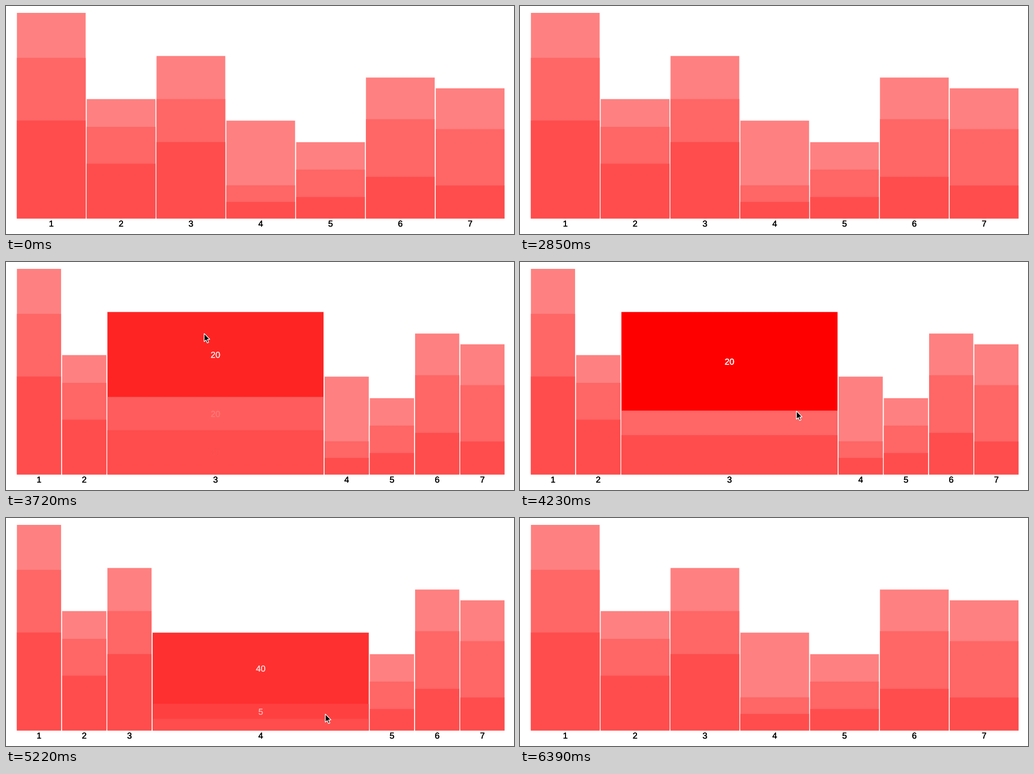
A matplotlib script that plays this animation: 960 px wide and 432 px high, repeating every 6.45 s.

```python
import math

import numpy as np
import matplotlib.pyplot as plt
from matplotlib.animation import FuncAnimation
from matplotlib.patches import Polygon, Rectangle
from matplotlib.patheffects import withStroke

W, H, DPI = 960, 432, 100
STEP, LOOP = 30, 6450
PX = 72 / DPI

LEFT, RIGHT, GAP = 20.6, 942.1, 2
BASE, ZERO, UNIT = 402.6, 401.0, 20.42
LABEL_END = 420
BAR_BASIS, SEG_BASIS = 2.25, 18.4
BAR_GROW, SEG_GROW = 5, 6
DURATION = 250
MOUSE_STEP = 12

# bar heights, and the values stacked in each bar from top to bottom
HEIGHTS = [19, 11, 15, 9, 7, 13, 12]
PARTS = [(20, 30, 50), (20, 30, 50), (20, 20, 40), (40, 5, 5),
         (30, 30, 20), (20, 30, 20), (20, 30, 15)]
TOPS = [ZERO - UNIT * h for h in HEIGHTS]

# key points of the pointer: ms, x, y
PATH = np.array([
    (3050, 352, 404), (3330, 363, 243), (3499, 368, 167.7), (3607, 372, 137.1),
    (3720, 374, 135), (4050, 450, 212), (4230, 522, 282), (4592, 600.2, 299),
    (4680, 613, 302), (4850, 621, 318), (5155, 605, 360.7), (5220, 603, 371),
    (5300, 602, 383), (5730, 597, 419), (5850, 596, 436)])
TIMES, POINTS = PATH[:, 0], PATH[:, 1:]
SLOPES = np.gradient(POINTS, TIMES, axis=0)
ARROW = np.array([(0.4, 0.4), (0.4, 16), (4, 12.7), (6.4, 18.4), (9, 17.3),
                  (6.6, 11.7), (11.2, 11.5)])

_s = np.linspace(0, 1, 400)
_ease_x = 0.75 * _s * (1 - _s) ** 2 + 0.75 * _s**2 * (1 - _s) + _s**3
_ease_y = 0.3 * _s * (1 - _s) ** 2 + 3 * _s**2 * (1 - _s) + _s**3


def ease(x):
    """CSS 'ease' timing curve."""
    return float(np.interp(x, _ease_x, _ease_y))


def pointer(t):
    """Smooth position along the path, or None while off stage."""
    if not TIMES[0] <= t <= TIMES[-1]:
        return None
    k = min(np.searchsorted(TIMES, t, "right") - 1, len(TIMES) - 2)
    span = TIMES[k + 1] - TIMES[k]
    u = (t - TIMES[k]) / span
    return ((1 + 2 * u) * (1 - u) ** 2 * POINTS[k]
            + u * (1 - u) ** 2 * span * SLOPES[k]
            + u * u * (3 - 2 * u) * POINTS[k + 1]
            + u * u * (u - 1) * span * SLOPES[k + 1])


# element -> list of [enter, leave]; bars are keyed b, segments (b, s)
hovers = {}


def hover_amount(key, t):
    """Transition progress; an early leave shortens the way back."""
    amount = 0.0
    for enter, leave in hovers.get(key, []):
        if t <= enter:
            break
        amount = ease((min(t, leave) - enter) / DURATION)
        if t > leave:
            amount *= 1 - ease((t - leave) / (amount * DURATION))
    return amount


def flex(total, basis, grow):
    grow = np.asarray(grow, float)
    return basis + (total - basis * len(grow)) * grow / grow.sum()


def bar_layout(t):
    """Left edges and widths of all bars."""
    count = len(HEIGHTS)
    grow = [1 + (BAR_GROW - 1) * hover_amount(b, t) for b in range(count)]
    widths = flex(RIGHT - LEFT - GAP * (count - 1), BAR_BASIS, grow)
    return LEFT + np.cumsum(widths + GAP) - widths - GAP, widths


def seg_layout(b, t):
    """Hover amounts and y edges of one bar's segments."""
    lit = [hover_amount((b, s), t) for s in range(3)]
    grow = [v * (1 + (SEG_GROW - 1) * p) for v, p in zip(PARTS[b], lit)]
    heights = flex(BASE - TOPS[b], SEG_BASIS, grow)
    return lit, TOPS[b] + np.concatenate([[0], np.cumsum(heights)])


def hit_test(t):
    """Elements under the pointer."""
    tip = pointer(t)
    if tip is None:
        return set()
    lefts, widths = bar_layout(t)
    for b, (x, w) in enumerate(zip(lefts, widths)):
        if x <= tip[0] <= x + w and TOPS[b] <= tip[1] <= LABEL_END:
            s = int(np.searchsorted(seg_layout(b, t)[1], tip[1])) - 1
            return {b, (b, s)} if s < 3 else {b}
    return set()


def record_hovers():
    """Follow the pointer once and note when elements are entered and left."""
    active = set()
    for t in range(1, LOOP, MOUSE_STEP):
        found = hit_test(t)
        for key in active - found:
            hovers[key][-1][1] = t
        for key in found - active:
            hovers.setdefault(key, []).append([t, math.inf])
        active = found


record_hovers()

fig = plt.figure(figsize=(W / DPI, H / DPI), dpi=DPI, facecolor="white")
ax = fig.add_axes([0, 0, 1, 1])
ax.set(xlim=(0, W), ylim=(H, 0))
ax.axis("off")


def add_text(text, color, y=0):
    return ax.text(0, y, text, color=color, ha="center", va="baseline",
                   family="Liberation Sans", fontsize=16.3 * PX, zorder=3,
                   path_effects=[withStroke(linewidth=0.3 * PX, foreground=color)])


rects, values, labels = {}, {}, []
for b, parts in enumerate(PARTS):
    labels.append(add_text(str(b + 1), "black", 418))
    for s, value in enumerate(parts):
        rects[b, s] = ax.add_patch(
            Rectangle((0, 0), 1, 1, lw=0, snap=False, zorder=1 + s / 10))
        values[b, s] = add_text(str(value), "white")
arrow = ax.add_patch(Polygon(ARROW, closed=True, fc="black", ec="white",
                             lw=1.3 * PX, joinstyle="miter", zorder=5))


def draw(i):
    t = i * STEP
    for b, (x, w) in enumerate(zip(*bar_layout(t))):
        labels[b].set_x(x + w / 2)
        lit, edges = seg_layout(b, t)
        for s, amount in enumerate(lit):
            # each part reaches the base so that no seams show
            rects[b, s].set_bounds(x, edges[s], w, BASE - edges[s])
            pale = (0.5 - 0.1 * s) * (1 - amount)
            rects[b, s].set_facecolor((1, pale, pale))
            text = values[b, s]
            text.set_position((x + w / 2, (edges[s] + edges[s + 1]) / 2 + 6.3))
            text.set_alpha(amount)
            text.set_visible(amount > 0.01)
    tip = pointer(t)
    arrow.set_visible(tip is not None)
    if tip is not None:
        arrow.set_xy(ARROW + tip)
    return []


anim = FuncAnimation(fig, draw, frames=LOOP // STEP, interval=STEP,
                     init_func=lambda: draw(0), repeat=True, repeat_delay=0)
plt.show()
```
